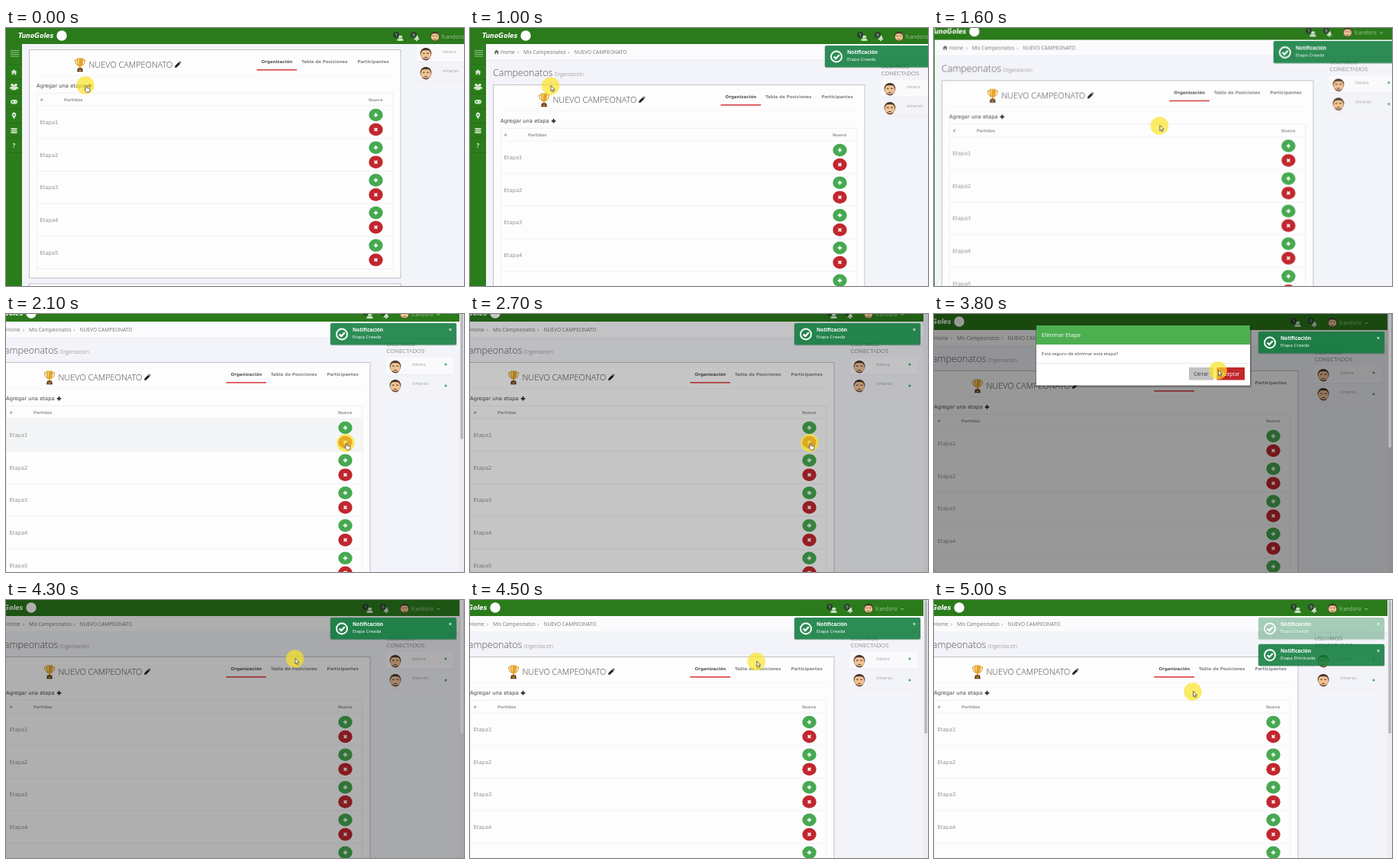
Recreate the animation shown at these times as an HTML page. Size 600x338 px, loop 5100 ms.

```html
<!DOCTYPE html>
<html lang="es">
<head>
<meta charset="utf-8">
<title>Campeonatos</title>
<style>
html, body { margin: 0; width: 100%; height: 100%; overflow: hidden; background: #f3f4f9; }
svg { display: block; width: 600px; height: 338px; }
text { font-family: "Open Sans", sans-serif; }
.v { font-family: "DejaVu Sans", sans-serif; }
.b { font-weight: 700; }
.l { font-weight: 300; }
.m { text-anchor: middle; }

#pan, #page, #shade, #modal, #made, #gone, #mouse, #hand, #arrow, #hover {
  animation: 5100ms linear infinite;
}
#pan { animation-name: pan; }
#page { animation-name: scroll; animation-timing-function: step-end; }
#shade { animation-name: shade; }
#modal { animation-name: modal; }
#made { animation-name: made; }
#gone { animation-name: gone; }
#mouse { animation-name: mouse; }
#hand { animation-name: hand; animation-timing-function: step-end; }
#arrow { animation-name: arrow; animation-timing-function: step-end; }
#hover { animation-name: hover; animation-timing-function: step-end; }

@keyframes pan {
  0%, 27.45% { transform: translate(0, 0); animation-timing-function: ease-in-out; }
  35.29%, 62.75% { transform: translate(-40px, -11px); animation-timing-function: ease-in-out; }
  70.59%, 100% { transform: translate(-40px, 0); }
}
@keyframes scroll {
  0% { transform: translateY(-46px); }
  9.8%, 100% { transform: translateY(0); }
}
@keyframes shade {
  0%, 50.98% { opacity: 0; }
  52.94% { opacity: .22; }
  54.9%, 82.35% { opacity: .4; }
  84.31% { opacity: .31; }
  88.24%, 100% { opacity: 0; }
}
@keyframes modal {
  0%, 54.9% { opacity: 0; transform: translateY(-25px); animation-timing-function: ease-out; }
  60.78%, 77.45% { opacity: 1; transform: translateY(0); animation-timing-function: ease-out; }
  82.35%, 100% { opacity: 0; transform: translateY(-25px); }
}
@keyframes made {
  0%, 13.73% { opacity: 0; }
  17.65%, 93.14% { opacity: 1; }
  98.04% { opacity: .42; }
  100% { opacity: .2; }
}
@keyframes gone {
  0%, 88.24% { opacity: 0; }
  93.14%, 100% { opacity: 1; }
}
@keyframes mouse {
  0%, 7.84% { transform: translate(104px, 75px); }
  19.61%, 23.53% { transform: translate(105.5px, 76px); animation-timing-function: ease-in-out; }
  38.24%, 60.78% { transform: translate(445px, 169px); animation-timing-function: ease-in-out; }
  72.55%, 76.47% { transform: translate(372px, 74px); }
  84.31%, 86.27% { transform: translate(378.5px, 77px); animation-timing-function: ease-in-out; }
  96.08%, 100% { transform: translate(339px, 120px); }
}
@keyframes hand {
  0% { opacity: 1; }
  9.8% { opacity: 0; }
  37.25% { opacity: 1; }
  62.75%, 100% { opacity: 0; }
}
@keyframes arrow {
  0% { opacity: 0; }
  9.8% { opacity: 1; }
  37.25% { opacity: 0; }
  62.75%, 100% { opacity: 1; }
}
@keyframes hover {
  0% { opacity: 0; }
  33.33% { opacity: 1; }
  52.94%, 100% { opacity: 0; }
}
</style>
</head>
<body>
<svg viewBox="0 0 600 338">
  <defs>
    <g id="face">
      <ellipse cy="-.5" rx="7.4" ry="7.6" fill="#4a3627"/>
      <ellipse cy=".6" rx="6.7" ry="7" fill="#f0c294"/>
      <path d="M-6.5 -2Q-6 -7.400 0 -7.400T6.5 -2L4.800 -4.600Q0 -5.400 -4.800 -4.600Z" fill="#4a3627"/>
      <path d="M-5.200 4.500Q-4 8.200 0 8.400T5.200 4.500Q3 7 0 6.700T-5.200 4.500Z" fill="#6b4a35"/>
      <path d="M-4.2 -.8h3M1.2 -.8h3M-1.800 4.600h3.600" stroke="#3b2a20" stroke-width=".9"/>
    </g>
    <g id="plus"><path d="M-2.7 0H2.7M0 -2.7V2.7" stroke-width="1.7"/></g>
    <g id="check" fill="none" stroke="#fff">
      <circle r="7" stroke-width="1.9"/>
      <path d="M-3.4 0L-.8 2.6 3.8 -2.2" stroke-width="2.2"/>
    </g>
    <g id="person"><circle cy="-2" r="1.8"/><path d="M-3.2 3.2Q-3 0 0 0T3.2 3.2Z"/></g>
    <g id="bell"><path d="M-3.6 2.4Q-2.2 1 -2.2 -1 -2 -3.4 0 -3.6 2 -3.4 2.2 -1 2.2 1 3.6 2.4Z"/><circle cy="3.2" r="1"/></g>
  </defs>

  <g id="pan">
    <g id="page">
      <rect y="-20" width="640" height="480" fill="#f3f4f9"/>
      <rect x="21" y="21" width="620" height="21" fill="#fbfbfd"/>
      <path d="M21 42H640" stroke="#e6e7ec" stroke-width=".7"/>
      <path d="M31.5 31.5L34.7 28.5 38 31.5H37V34.2H35.4V32H34V34.2H32.5V31.5Z" fill="#666"/>
      <g font-size="6.65" fill="#777">
        <text x="40" y="33.7">Home</text>
        <text x="62" y="33.5">›</text>
        <text x="70" y="33.7">Mis Campeonatos</text>
        <text x="128.5" y="33.5">›</text>
        <text x="136.5" y="33.7">NUEVO CAMPEONATO</text>
      </g>
      <text class="l" x="30" y="63" font-size="12.5" fill="#555">Campeonatos</text>
      <text class="l" x="110.5" y="63" font-size="6.5" fill="#777">Organización</text>

      <g fill="#fdfdfe" stroke="#bcbcc0" stroke-width=".9">
        <rect x="30.5" y="74.5" width="486.5" height="299"/>
        <rect x="30.5" y="381" width="486.5" height="100"/>
      </g>
      <path d="M40 108.5H507" stroke="#f4f4f6" stroke-width=".7"/>

      <g transform="translate(97 94)">
        <path d="M-4 -6H-6.500Q-6 0 -2 1.500M4 -6H6.500Q6 0 2 1.500" fill="none" stroke="#d9971e" stroke-width="1.1"/>
        <path d="M-4.300 -8.500H4.300Q4.300 1 1 2.500V5H-1V2.500Q-4.300 1 -4.300 -8.500Z" fill="#e3a42c"/>
        <path d="M-2.700 -7.500H-1Q-1.500 -1 -.5 1 -2.700 -1 -2.700 -7.500Z" fill="#fbdf84"/>
        <path d="M-3 4.6H3L4 9.3H-4Z" fill="#5c3a26"/>
        <path d="M-1.800 6.500H1.800V8H-1.800Z" fill="#c99a3d"/>
      </g>
      <text class="l" x="108.5" y="97.6" font-size="10.9" fill="#444">NUEVO CAMPEONATO</text>
      <path d="M221 98L221.7 95.3 226.3 90.7 228.4 92.8 223.7 97.4ZM226.9 90.1L227.7 89.5 229.5 91.3 228.9 92.2Z" fill="#222"/>

      <g font-size="5.5" fill="#858585">
        <text class="v b" x="334.5" y="92.4" fill="#555">Organización</text>
        <text class="v b" x="387" y="92.4">Tabla de Posiciones</text>
        <text class="v b" x="460.5" y="92.4">Participantes</text>
      </g>
      <rect x="328.5" y="100" width="52.5" height="1.7" fill="#dd4b4f"/>

      <text class="v" x="40" y="124.3" font-size="6.8" fill="#444">Agregar una etapa</text>
      <use href="#plus" x="109.5" y="121.8" stroke="#222"/>
      <rect id="hover" x="40" y="148" width="467" height="42.7" fill="#f3f5f6"/>
      <g class="b" font-size="5.2" fill="#999">
        <text class="v" x="44.5" y="142">#</text>
        <text class="v" x="76" y="142">Partidos</text>
        <text class="v" x="475" y="142">Nuevo</text>
      </g>
      <rect x="40.3" y="131.3" width="466.7" height="230.3" fill="none" stroke="#ebecef" stroke-width=".8"/>
      <g id="rows"></g>

      <text class="l" x="538.5" y="53" font-size="7.7" fill="#555">USUARIOS</text>
      <text class="l" x="538.5" y="61.6" font-size="7.9" fill="#555">CONECTADOS</text>
      <rect x="538" y="68" width="88" height="22" fill="#fafafd"/>
      <path d="M538 90.5H626M538 116H626" stroke="#e8e9ee" stroke-width=".7"/>
      <use href="#face" x="550" y="80"/>
      <use href="#face" x="550" y="105"/>
      <g class="l" font-size="5.5" fill="#777">
        <text x="572" y="78.6">tlobera</text>
        <text x="572" y="103.8">olmarsio</text>
      </g>
      <g fill="#45a85a"><circle cx="616" cy="77" r="1.5"/><circle cx="616" cy="105" r="1.5"/></g>
    </g>

    <rect y="21" width="21" height="345" fill="#2b7d1c"/>
    <rect width="640" height="21" fill="#2b7a1b"/>
    <g id="side" stroke="#25691a" stroke-width=".8"></g>
    <path d="M6 29.5H17M6 32H17M6 34.5H17M6 37H17" stroke="#b9d6b2" stroke-width="1" stroke-dasharray="1.5 .5"/>
    <g fill="#d5e8d0">
      <path d="M6.5 58L10.5 54.2 14.5 58H13.3V61.3H11.3V59H9.7V61.3H7.7V58Z"/>
      <use href="#person" x="8" y="76.5"/><use href="#person" x="13" y="76.5"/>
      <use href="#person" x="10.5" y="78"/>
      <rect x="6" y="94" width="9" height="5.5" rx="2.7"/>
      <path d="M10.5 119.5L8 115A2.9 2.9 0 1 1 13 115Z"/>
      <path d="M6.5 131.3H14.5V133H6.5ZM6.5 133.8H14.5V135.5H6.5ZM6.5 136.3H14.5V138H6.5Z"/>
      <text class="b m" x="10.5" y="157.3" font-size="8">?</text>
    </g>
    <path d="M7.5 96.8H10M8.7 95.6V98M12.3 96.8H13.7" stroke="#2b7d1c" stroke-width=".9"/>
    <circle cx="10.5" cy="114" r="1" fill="#2b7d1c"/>

    <text class="v b" x="16" y="13.3" font-size="8" font-style="italic" fill="#fff">TunoGoles</text>
    <circle cx="73" cy="10" r="6.7" fill="#fff"/>

    <g fill="#cfe3ca">
      <use href="#person" x="515.5" y="13.5"/><use href="#person" x="517.5" y="13.5"/>
      <use href="#bell" x="538" y="13"/>
    </g>
    <g fill="#26432a"><circle cx="511" cy="9" r="4"/><circle cx="534" cy="9" r="4"/></g>
    <g class="m" font-size="5.5" fill="#fff"><text x="511" y="11">1</text><text x="534" y="11">0</text></g>
    <use href="#face" transform="translate(562 11) scale(.77)"/>
    <text class="l" x="571" y="13.6" font-size="7" fill="#e0eedc">fcandoriz</text>
    <path d="M604.5 11L606.2 12.7 608 11" fill="none" stroke="#cfe3ca" stroke-width=".9"/>

    <rect x="634" width="6" height="370" fill="#eeeef0"/>
    <rect id="shade" width="640" height="370"/>
    <rect x="635.3" width="3.7" height="175" rx="1.5" fill="#b9babe"/>

    <g id="modal">
      <rect x="173" y="15" width="283" height="81" rx="2" fill="#000" opacity=".25"/>
      <rect x="174" y="15" width="280" height="78.5" fill="#fff"/>
      <rect x="174" y="15" width="280" height="25" fill="#4caf50"/>
      <text x="181" y="30.3" font-size="7.6" fill="#fff">Eliminar Etapa</text>
      <text x="181" y="53.8" font-size="6.1" fill="#444">Está seguro de eliminar esta etapa?</text>
      <path d="M174 64.5H454" stroke="#e3e3e3" stroke-width=".8"/>
      <rect x="374" y="70" width="32" height="16.5" fill="#c2c2c2"/>
      <rect x="410.5" y="70" width="36.5" height="16.5" fill="#c1272d"/>
      <g class="m" font-size="6.6">
        <text x="390" y="80.8" fill="#333">Cerrar</text>
        <text x="428.7" y="80.8" fill="#fff">Aceptar</text>
      </g>
    </g>
    <g id="toasts"></g>
  </g>

  <g id="mouse">
    <circle r="11.7" fill="#fbe224" opacity=".7"/>
    <path id="arrow" d="M.5 -.5V6.6L2.1 5.200 3.2 7.700 4.400 7.200 3.300 4.700H5.500Z" fill="#fff" stroke="#333" stroke-width=".7"/>
    <path id="hand" d="M.3 .6Q1.2 -.3 2 .6V3.5L5.5 4.2Q6.2 4.5 6 6L5.3 9H1.3L-1.3 5.6Q-1 4.6 .3 5.3Z" fill="#fff" stroke="#333" stroke-width=".7"/>
  </g>
</svg>

<script>
const put = (id, html) => { document.getElementById(id).innerHTML = html; };
const times = (n, fn) => Array.from({ length: n }, (_, i) => fn(i)).join("");

const button = (y, color, turn) => `
  <g transform="translate(484.5 ${y})">
    <ellipse rx="9.2" ry="8.3" fill="${color}"/>
    <use href="#plus" stroke="#fff" transform="rotate(${turn})"/>
  </g>`;

const row = i => {
  const y = 148 + 42.7 * i;
  return `<path d="M40 ${y}H507" stroke="#eeeff2" stroke-width=".8"/>
    <text class="v" x="44.5" y="${y + 24}" font-size="6.8" fill="#929292">Etapa${i + 1}</text>
    ${button(y + 12, "#46a950", 0)}${button(y + 31, "#c1272d", 45)}`;
};

const toast = (id, y, message) => `
  <g id="${id}"><g transform="translate(465 ${y})">
    <rect x="-.7" y=".3" width="166.5" height="29.3" rx="2.5" opacity=".16"/>
    <rect width="165" height="28.5" rx="2" fill="#0c7d3c" fill-opacity=".83"/>
    <use href="#check" x="15" y="14.5"/>
    <g fill="#fff">
      <text class="b" x="29" y="11.2" font-size="6.6">Notificación</text>
      <text x="29" y="20.4" font-size="6.05">${message}</text>
      <text class="b m" x="157" y="11.3" font-size="7">×</text>
    </g>
  </g></g>`;

put("rows", times(5, row));
put("side", times(7, i => `<path d="M0 ${48 + 19.2 * i}H21"/>`));
put("toasts", toast("made", 23, "Etapa Creada") + toast("gone", 57.7, "Etapa Eliminada"));
</script>
</body>
</html>
```
